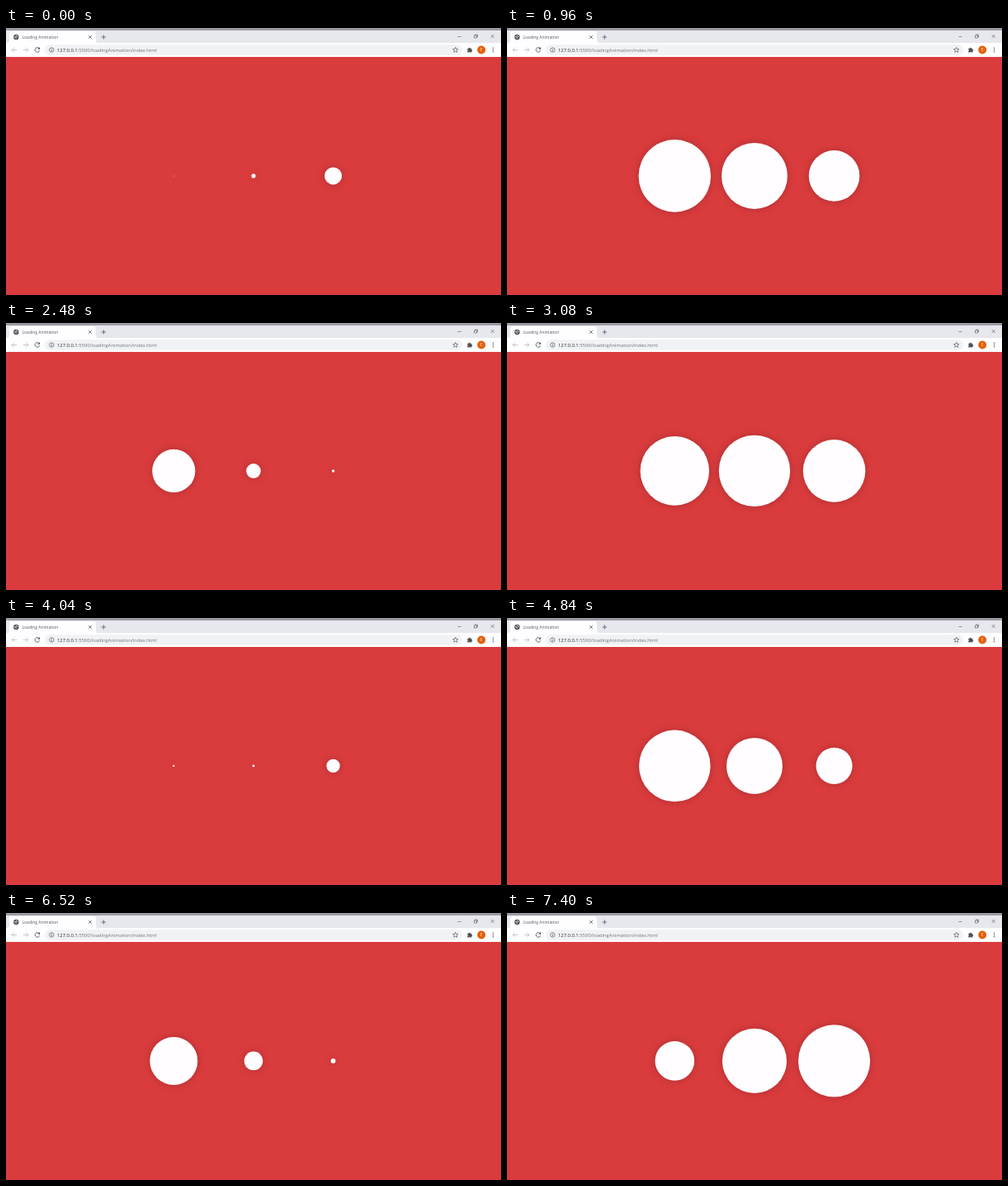
An HTML page that plays this animation: 600x323 px, repeating every 7.44 s.

```html
<!DOCTYPE html>
<html lang="en">
<head>
<meta charset="utf-8">
<title>Loading Animation</title>
<style>
  html, body { margin: 0; width: 100%; height: 100%; overflow: hidden; background: #da3c3d; }
  svg { display: block; width: 600px; height: 323px; }
  text { font-family: "Open Sans", "Noto Sans", sans-serif; }
  .line { fill: none; stroke: #55585d; stroke-width: .8; }
  .dot { fill: #fffdff; filter: drop-shadow(0 0 5px rgba(40, 0, 10, .25)); }
</style>
</head>
<body>
<svg viewBox="0 0 600 323">
  <rect width="600" height="323" fill="#da3c3d"/>

  <!-- tab strip -->
  <rect width="600" height="19" fill="#e7e7ee"/>
  <rect width="600" height="3" fill="#9c9ba3"/>
  <path d="M0 18.5Q4 18.5 4 15V7Q4 4 7 4H106Q109 4 109 7V15Q109 18.5 113 18.5Z" fill="#fefdff"/>
  <circle cx="12.3" cy="11" r="3.2" fill="#505358"/>
  <path d="M10 10.3l2.2 1v1.6M12.4 8.6l.4 1.3 1.6.5" class="line" style="stroke:#fff"/>
  <text x="19.5" y="12.9" font-size="5" fill="#55585d">Loading Animation</text>
  <path d="M100.2 9.2l3.6 3.6m0-3.6l-3.6 3.6M115.6 11h5.4m-2.7-2.7v5.4" class="line"/>
  <path d="M547.5 10.5h4M567.5 9h3v3h-3zM568.5 9V8h3v3h-1M587.7 8l4 4m0-4l-4 4" class="line" style="stroke-width:.6"/>

  <!-- toolbar -->
  <rect y="18" width="600" height="17" fill="#fefdff"/>
  <rect x="47" y="20.3" width="506" height="12.4" rx="6.2" fill="#f1f2f5"/>
  <path d="M13 26.5H7m2.8-2.8L7 26.5l2.8 2.8M21 26.5h6m-2.8-2.8l2.8 2.8-2.8 2.8" class="line" style="stroke:#b9babf"/>
  <path d="M40.2 24.8A2.8 2.8 0 1 0 40.6 27.3" class="line" style="stroke-width:.9"/>
  <path d="M41 23v2.8h-2.8z" fill="#505358"/>
  <circle cx="55.3" cy="26.5" r="2.7" class="line" style="stroke-width:.7"/>
  <path d="M55.3 24.8v.8m0 .6v2" class="line"/>
  <text x="62" y="28.6" font-size="5.83" fill="#707378"><tspan fill="#25272b">127.0.0.1</tspan>:5500/loadingAnimation/index.html</text>
  <path d="M544.8 23.3l.9 2.1 2.3.2-1.8 1.5.6 2.2-2-1.2-2 1.2.6-2.2-1.8-1.5 2.3-.2z" class="line" style="stroke-width:.7"/>
  <path d="M559.3 24.8h1.5a1 1 0 0 1 2 0h1.5v1.4a1 1 0 0 1 0 2v1.4h-1.6a1 1 0 0 0-1.8 0h-1.6v-1.6a1 1 0 0 0 0-1.8z" fill="#505358"/>
  <circle cx="576.2" cy="26.5" r="5" fill="#e5600c"/>
  <text x="576.2" y="28.4" font-size="5" text-anchor="middle" fill="#fbe5d6">E</text>
  <g fill="#505358">
    <circle cx="590.5" cy="24.3" r=".7"/><circle cx="590.5" cy="26.5" r=".7"/><circle cx="590.5" cy="28.7" r=".7"/>
  </g>

  <circle class="dot" cx="203.3" cy="178.9"/>
  <circle class="dot" cx="300" cy="178.9"/>
  <circle class="dot" cx="396.6" cy="178.9"/>
</svg>
<script>
  const LOOP = 7440, BEAT = 1000, START = 74, RADIUS = 43.9;
  const delays = [0, 244, 414];
  const dots = document.querySelectorAll('.dot');

  // cubic-bezier(.42, 0, .58, 1)
  function easeInOut(x) {
    let lo = 0, hi = 1, u;
    for (let i = 0; i < 24; i++) {
      u = (lo + hi) / 2;
      const v = 1 - u;
      if (1.26 * v * v * u + 1.74 * v * u * u + u * u * u < x) lo = u;
      else hi = u;
    }
    return u * u * (3 - 2 * u);
  }

  function draw(now) {
    const time = now % LOOP + START;
    dots.forEach((dot, i) => {
      const phase = ((time - delays[i]) / BEAT + 2) % 2;
      dot.setAttribute('r', RADIUS * easeInOut(1 - Math.abs(1 - phase)));
    });
    requestAnimationFrame(draw);
  }
  draw(0);
</script>
</body>
</html>
```
